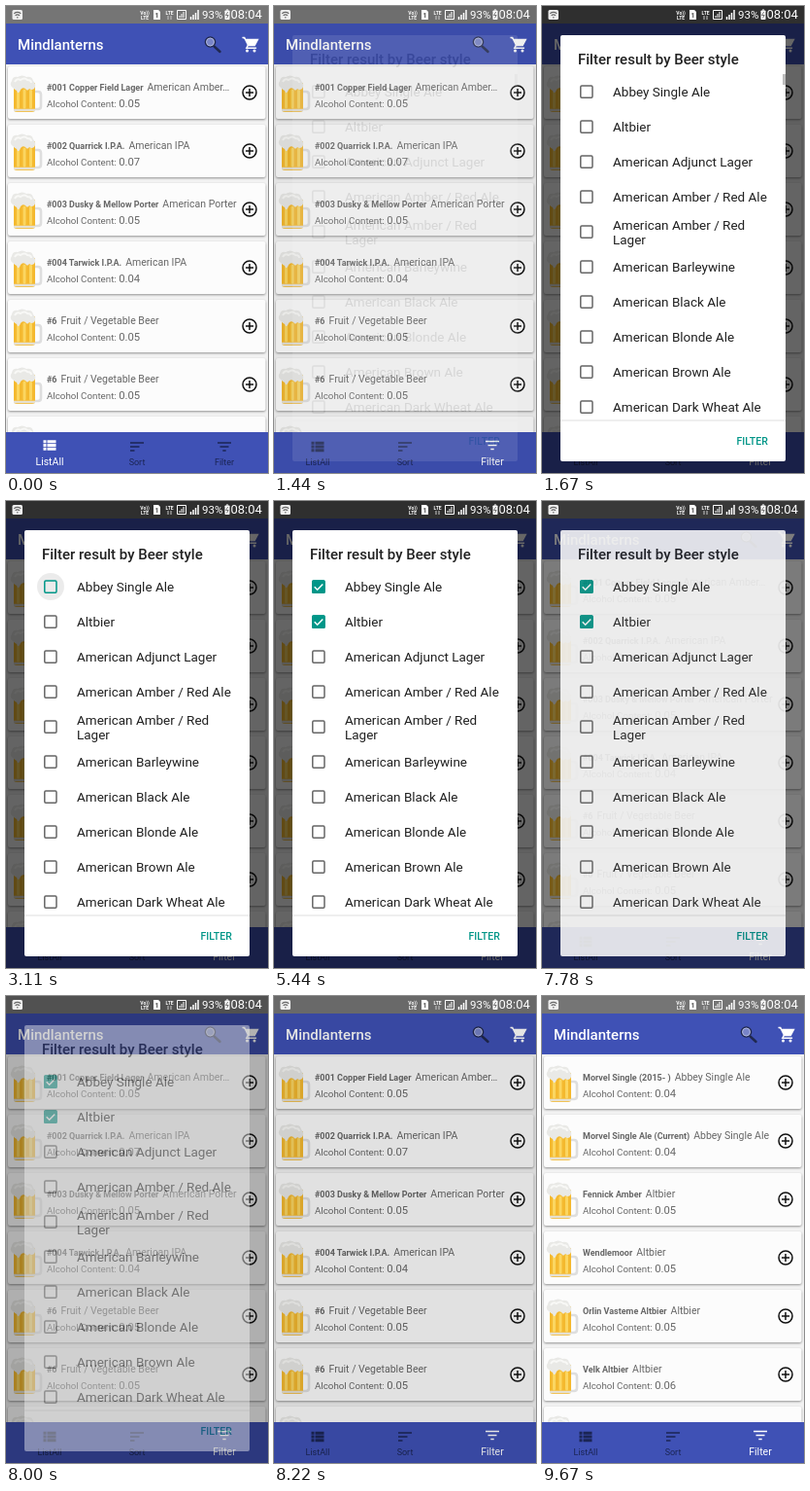
An HTML page for the animation above (10 s loop, 270 px wide and 480 px high).

```html
<!DOCTYPE html>
<html lang="en">
<head>
<meta charset="utf-8">
<title>Beer list filter</title>
<style>
  html, body { margin: 0; width: 100%; height: 100%; overflow: hidden; background: #fafafa; }
  svg { display: block; width: 100%; height: 100%; }
  text { font-family: Roboto, sans-serif; white-space: pre; }
  .card { fill: #fcfcfc; filter: drop-shadow(0 1px 1px #0006); }
  .name { font-size: 9px; font-weight: 700; fill: #666; }
  .style { font-size: 10.5px; font-weight: 400; }
  .label { font-size: 9.75px; }
  .value { font-size: 11.25px; }
  .heading { font-size: 15px; font-weight: 500; }
  .item { font-size: 13.5px; fill: #212121; }
  .button { font-size: 10.5px; font-weight: 500; fill: #009688; }
  .line { fill: none; stroke: #fff; }
</style>
</head>
<body>
<svg id="stage" viewBox="0 0 270 480"></svg>
<script>
const LOOP = 10000, STEP = 111;
const OPEN = 1300, SWAP = 8440;
const TAPS = [3000, 4220];

const allBeers = [
  ['#001 Copper Field Lager', 'American Amber…', '0.05'],
  ['#002 Quarrick I.P.A.', 'American IPA', '0.07'],
  ['#003 Dusky & Mellow Porter', 'American Porter', '0.05'],
  ['#004 Tarwick I.P.A.', 'American IPA', '0.04'],
  ['#6', 'Fruit / Vegetable Beer', '0.05'],
  ['#6', 'Fruit / Vegetable Beer', '0.05'],
  ['', '', '']
];
const filteredBeers = [
  ['Morvel Single (2015- )', 'Abbey Single Ale', '0.04'],
  ['Morvel Single Ale (Current)', 'Abbey Single Ale', '0.04'],
  ['Fennick Amber', 'Altbier', '0.05'],
  ['Wendlemoor', 'Altbier', '0.05'],
  ['Orlin Vasteme Altbier', 'Altbier', '0.05'],
  ['Velk Altbier', 'Altbier', '0.06'],
  ['', '', '']
];
const styles = ['Abbey Single Ale', 'Altbier', 'American Adjunct Lager', 'American Amber / Red Ale',
  'American Amber / Red|Lager', 'American Barleywine', 'American Black Ale', 'American Blonde Ale',
  'American Brown Ale', 'American Dark Wheat Ale'];

const escape = s => s.replace(/&/g, '&amp;');
const rect = (x, y, w, h, fill, extra = '') =>
  `<rect x="${x}" y="${y}" width="${w}" height="${h}" fill="${fill}" ${extra}/>`;
const text = (x, y, s, attrs) => `<text x="${x}" y="${y}" ${attrs}>${s}</text>`;
const path = (d, attrs) => `<path d="${d}" ${attrs}/>`;

const mug = `
  <path d="M29 26h4q3 0 3 3v12q0 3-3 3h-4" fill="none" stroke="#dedede" stroke-width="2.6"/>
  <path d="M8 17h22v27q0 3-3 3H11q-3 0-3-3z" fill="#f4b92f"/>
  <path d="M12.5 25v17M19 25v17M25.5 25v17" stroke="#fbd661" stroke-width="3" stroke-linecap="round"/>
  <path d="M8 45h22" stroke="#e5e0d2" stroke-width="2.5"/>
  <path d="M7 22q-4-3-1-7 1-5 6-4 5-3 9 0 6-1 7 4 4 4 1 8-3 2-5 0-2 3-4 0-3-2-5 1-2 6-4 1-2-1-4-3z" fill="#e9e9e6"/>
  <path d="M9 16q2-4 6-2 4-3 7 0 4 0 4 3" fill="none" stroke="#f8f8f6" stroke-width="2"/>`;

const beerRow = ([name, style, alcohol], i) => `<g transform="translate(0 ${62 + 60 * i})">
  ${rect(2, 0, 265.5, 54, '#fcfcfc', 'rx="2" class="card"')}${mug}
  ${text(42, 25, `${escape(name)}<tspan class="style" dx="4">${style}</tspan>`, 'class="name"')}
  ${text(42, 42, `Alcohol Content: <tspan class="value">${alcohol}</tspan>`, 'class="label" fill="#666"')}
  <circle cx="251" cy="27" r="7" fill="none" stroke="#111" stroke-width="1.5"/>
  ${path('M247 27h8M251 23v8', 'stroke="#111" stroke-width="1.5"')}</g>`;

const icons = [
  'M-6.5 -3.7h3M-2.5 -3.7h9M-6.5 0h3M-2.5 0h9M-6.5 3.7h3M-2.5 3.7h9',
  'M-7 -4H7M-7 0H2.5M-7 4H-2.5',
  'M-7 -4H7M-4.5 0H4.5M-1.7 4H1.7'
];
const tabs = active => ['ListAll', 'Sort', 'Filter'].map((label, i) => {
  const on = i === active, colour = on ? '#fff' : '#1b2554';
  return `<g transform="translate(${45 + 90 * i} ${on ? 451.5 : 453})">
    ${path(icons[i], `stroke="${colour}" stroke-width="${i ? 1.6 : 2.9}"`)}</g>` +
    text(45 + 90 * i, 472, label, `text-anchor="middle" font-size="${on ? 10.5 : 9}" fill="${colour}"`);
}).join('');

const toolbar = rect(0, 0, 270, 18, '#757575') + rect(0, 18, 270, 42, '#3f51b5', 'class="bar"') +
  text(12, 45, 'Mindlanterns', 'class="heading" fill="#fff"') +
  path('M214.5 41.5l6 5.5', 'stroke="#20284f" stroke-width="2.4" stroke-linecap="round"') +
  '<circle cx="210.5" cy="37" r="5" fill="#7884c8" stroke="#20284f" stroke-width="1.6"/>' +
  '<circle cx="210.5" cy="37" r="4" fill="none" stroke="#c3c9e8" stroke-width=".8"/>' +
  path('M243.5 32.5h2.2l4 8h6.5l3.2-6H247', 'fill="#fff" stroke="#fff" stroke-width="1.5"') +
  path('M249.5 40l-1.6 3.2h10.2', 'class="line" stroke-width="1.5"') +
  '<circle cx="248.5" cy="46" r="1.5" fill="#fff"/><circle cx="256" cy="46" r="1.5" fill="#fff"/>';

const tiny = 'font-size="5" font-weight="700" fill="#fff" text-anchor="middle"';
const statusIcons = rect(6.5, 4, 10.5, 10, '#eee', 'rx="1.5"') +
  path('M8.3 7.7q3.5-2.6 7 0M9.6 9.7q2.2-1.6 4.4 0M11.8 11v1.5', 'fill="none" stroke="#666" stroke-width="1.1"') +
  text(143, 8.5, 'Vo))', tiny) + text(143, 13.5, 'LTE', tiny) +
  path('M152 4h5l2 2v8h-7z', 'fill="#fff"') + text(155.5, 12, '1', 'font-size="7" font-weight="700" fill="#444" text-anchor="middle"') +
  text(168.5, 8.5, 'LTE', tiny) + path('M167 10v4M170 10v4', 'stroke="#ccc"') +
  path('M176.5 4.5h9v9h-9zM179 12v-2M181 12v-4M183 12v-6', 'class="line" stroke-width="1"') +
  path('M190.5 14v-3M193 14v-5M195.5 14v-7M198 14v-10', 'class="line" stroke-width="1.5"') +
  text(202, 13, '93%', 'font-size="11.5" fill="#fff"') +
  rect(225.5, 4.5, 5, 9.5, '#fff', 'rx=".7"') + rect(227, 3.5, 2, 1, '#fff') +
  path('M228.6 6l-2 3.5h2.6l-1.8 3', 'fill="none" stroke="#555" stroke-width=".8"') +
  text(231.5, 13, '08:04', 'font-size="13" fill="#fff"');

const option = (label, i) => {
  const y = 88 + 36 * i, lines = label.split('|');
  const tappable = i < TAPS.length;
  return (tappable ? `<circle id="ripple${i}" cx="46" cy="${y}" r="14" fill="#000"/>` : '') +
    rect(39.8, y - 6, 12.2, 12.2, 'none', `id="box${i}" rx="1.2" stroke="#666" stroke-width="1.5"`) +
    (tappable ? `<g id="check${i}">${rect(39, y - 6.8, 13.8, 13.8, '#009688', 'rx="1.5"')}
      ${path(`M41.7 ${y + .3}l3 3 5.6-5.8`, 'class="line" stroke-width="1.5"')}</g>` : '') +
    lines.map((s, k) => text(73, y + 5 + (lines.length > 1 ? 15 * k - 7.5 : 0), s, 'class="item"')).join('');
};
const dialog = rect(19, 30, 232, 438, '#fff', 'rx="2"') +
  text(37, 59.5, 'Filter result by Beer style', 'class="heading" fill="#212121"') +
  styles.map(option).join('') +
  rect(19, 425.5, 232, 1, '#e0e0e0') + text(200.5, 451, 'FILTER', 'class="button"') +
  rect(248, 70, 3, 11, '#bdbdbd', 'id="scrollbar"');

const stage = document.getElementById('stage');
stage.innerHTML = rect(0, 0, 270, 480, '#f2f2f2') +
  `<g id="all">${allBeers.map(beerRow).join('')}</g>
  <g id="filtered">${filteredBeers.map(beerRow).join('')}</g>` +
  toolbar + rect(0, 438, 270, 42, '#3f51b5') +
  `<g id="listTab">${tabs(0)}</g><g id="filterTab">${tabs(2)}</g>` +
  rect(0, 0, 270, 480, '#000', 'id="scrim"') +
  `<g id="dialog">${dialog}</g>` + statusIcons;

const el = id => document.getElementById(id);
const ramp = (t, from, to) => Math.min(1, Math.max(0, (t - from) / (to - from)));
const fade = (id, opacity) => el(id).setAttribute('opacity', opacity);

function render(t) {
  fade('all', t < SWAP ? 1 : 0);
  fade('filtered', t < SWAP ? 0 : 1);
  fade('listTab', t < OPEN ? 1 : 0);
  fade('filterTab', t < OPEN ? 0 : 1);
  const opened = ramp(t, OPEN, OPEN + 300);
  fade('scrim', .6 * opened * (1 - ramp(t, 7670, 8330)));
  fade('dialog', opened * (1 - ramp(t, 7700, 8200)));
  fade('scrollbar', 1 - ramp(t, 1900, 2200));
  TAPS.forEach((tap, i) => {
    const release = tap + 200;
    fade('ripple' + i, .08 * ramp(t, tap, tap + 80) * (1 - ramp(t, release, release + 250)));
    fade('check' + i, ramp(t, release - 40, release + 120));
    el('box' + i).setAttribute('stroke', t < tap ? '#666' : '#009688');
  });
}

const start = performance.now();
function tick() {
  const t = (performance.now() - start) % LOOP;
  render(Math.floor(t / STEP) * STEP);
  requestAnimationFrame(tick);
}
tick();
</script>
</body>
</html>
```
